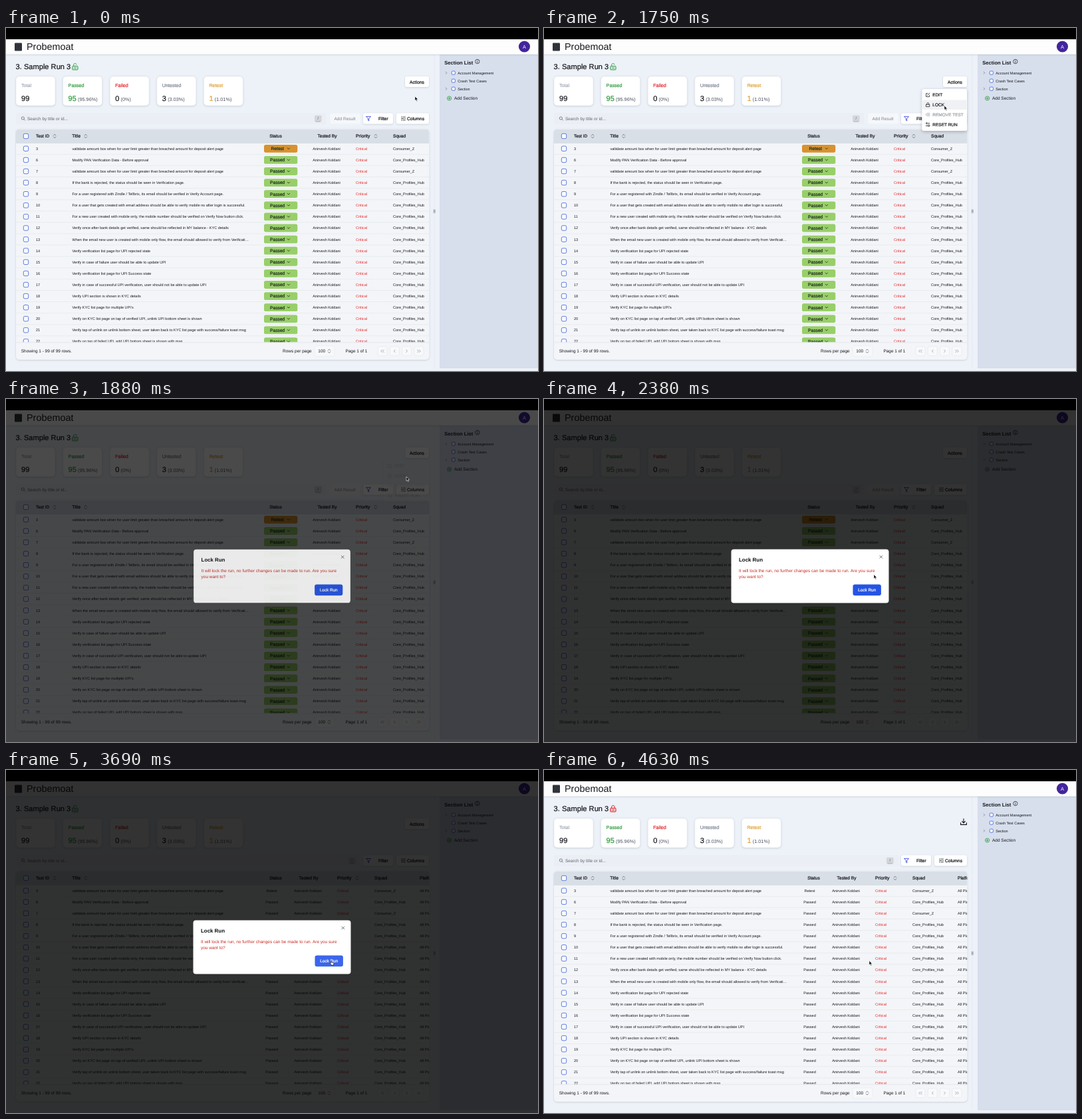
Recreate the animation shown at these times as an HTML page. Size 800 px wide and 517 px high, loop 5.06 s.

```html
<!DOCTYPE html>
<html lang="en">
<head>
<meta charset="utf-8">
<title>Lock a test run</title>
<style>
html, body { margin: 0; width: 100%; height: 100%; overflow: hidden; background: #edf1f8; }
svg { display: block; width: 800px; height: 517px; }
text { font-family: "Liberation Sans", Arial, sans-serif; text-rendering: geometricPrecision; white-space: pre; }
.line { fill: none; stroke-linecap: round; stroke-linejoin: round; }
</style>
</head>
<body>
<svg id="stage" viewBox="0 0 800 517"></svg>
<script>
const INK = '#16181d', GRAY = '#7d8696', RED = '#e5262b', GREEN = '#2f9a3c', BLUE = '#4468d8';
const TESTER = 'Anirvesh Koldani', SQUAD = 'Core_Profiles_Hub', SQUAD_ALT = 'Consumer_Z';
const TITLES = [
  'valitdate amount box when for user limit greater than breached amount for deposit alert page',
  'Modify PAN Verification Data - Before approval',
  'valitdate amount box when for user limit greater than breached amount for deposit alert page',
  'If the bank is rejected, the status should be seen in Verification page.',
  'For a user registered with Zindle / Tellbrix, its email should be verified in Verify Account page.',
  'For a user that gets created with email address should be able to verify mobile no after login is successful.',
  'For a new user created with mobile only, the mobile number should be verified on Verify Now button click.',
  'Verify once after bank details get verified, same should be reflected in MY balance - KYC details',
  'When the email new user is created with mobile only flow, the email should allowed to verify from Verificati…',
  'Verify verification list page for UPI rejected state',
  'Verify in case of failure user should be able to update UPI',
  'Verify verification list page for UPI Success state',
  'Verify in case of successful UPI verification, user should not be able to update UPI',
  'Verify UPI section is shown in KYC details',
  "Verify KYC list page for multiple UPI's",
  'Verify on KYC list page on tap of verified UPI, unlink UPI bottom sheet is shown',
  'Verify tap of unlink on unlink bottom sheet, user taken back to KYC list page with success/failure toast msg',
  'Verify on tap of failed UPI, add UPI bottom sheet is shown with msg'
];

// Text is placed by the middle of its capitals.
const text = (x, y, s, size = 5.55, fill = INK, o = {}) =>
  `<text x="${x}" y="${y + size * 0.358}" font-size="${size}" fill="${fill}"` +
  (o.mid ? ' text-anchor="middle"' : '') + (o.bold ? ' font-weight="700"' : '') +
  (o.semi ? ` stroke="${fill}" stroke-width=".22"` : '') + `>${s}</text>`;
const rect = (x, y, w, h, fill, r = 0, more = '') =>
  `<rect x="${x}" y="${y}" width="${w}" height="${h}" rx="${r}" fill="${fill}" ${more}/>`;
const line = (d, stroke = INK, w = 0.8) => `<path class="line" d="${d}" stroke="${stroke}" stroke-width="${w}"/>`;
const ring = (x, y, r, stroke, w = 0.8) =>
  `<circle cx="${x}" cy="${y}" r="${r}" fill="none" stroke="${stroke}" stroke-width="${w}"/>`;
const group = (id, inner, more = '') => `<g id="${id}" ${more}>${inner}</g>`;
const box = (x, y, s = 7.4) =>
  rect(x - s / 2, y - s / 2, s, s, '#f8faff', s / 4, `stroke="${BLUE}" stroke-width=".85"`);
const button = (x, y, w, h) => rect(x, y, w, h, '#fff', 3, 'filter="url(#soft)"');
const sorter = (x, y) => line(`M${x - 1.8} ${y - 1}l1.8 -1.8 1.8 1.8M${x - 1.8} ${y + 1}l1.8 1.8 1.8 -1.8`, '#4d5562', 0.7);
const chevron = (x, y, dir, stroke, s = 1.9) => line(`M${x - dir * s / 2} ${y - s}l${dir * s} ${s} ${-dir * s} ${s}`, stroke, 0.75);

function header() {
  return rect(0, 0, 800, 17, '#000') + rect(0, 17, 800, 22.5, '#fdfdfd', 0, 'filter="url(#soft)"') +
    rect(0, 0, 800, 17, '#000') + rect(13, 22.5, 11, 12, '#30343a', 1) +
    text(31, 28, 'Probemoat', 14.4) +
    '<circle cx="779.5" cy="28" r="8.6" fill="#43259b"/>' + text(779.5, 28.1, 'A', 7.4, '#fff', { mid: 1 });
}

function sidebar() {
  const items = ['Account Management', 'Crash Test Cases', 'Section'];
  let s = rect(652, 40, 148, 473, '#d7dfed') + line('M644 40V513', '#dfe4ee', 0.6) +
    rect(642.4, 273, 3.6, 6.4, '#cdd3dd', 1) +
    line('M643.6 274.5v3.4M645 274.5v3.4', '#6c7480', 0.5) +
    text(659.3, 52.4, 'Section List', 7.6, INK, { bold: 1 }) +
    ring(708.8, 50.5, 3.2, INK, 0.7) + line('M708.8 50.2v2M708.8 48.8v.1', INK, 0.7);
  items.forEach((name, i) => {
    const y = 67.6 + 12 * i;
    s += box(672.8, y, 5.2) + text(679.2, y, name);
    if (i !== 1) s += chevron(662, y, 1, '#6c7686', 1.6);
  });
  return s + ring(666.6, 106, 3.1, GREEN) + line('M665 106h3.2M666.6 104.4v3.2', GREEN) +
    text(674, 106, 'Add Section', 6.5);
}

function cards() {
  return [
    ['Total', '99', '', GRAY, INK], ['Passed', '95', '(95.96%)', GREEN, GREEN],
    ['Failed', '0', '(0%)', RED, INK], ['Untested', '3', '(3.03%)', GRAY, INK],
    ['Retest', '1', '(1.01%)', '#e0a035', '#e0a035']
  ].map(([label, n, pct, c1, c2], i) => {
    const x = 15 + 70.6 * i;
    return rect(x, 73, 59, 44, '#fff', 5, 'filter="url(#soft)" stroke="#dfe3ea" stroke-width=".5"') +
      text(x + 8, 86.2, label, 7.2, c1, { semi: i > 0 }) + text(x + 8, 106.3, n, 11.1, c2, { semi: 1 }) +
      text(x + (n.length > 1 ? 22.4 : 16.4), 107.3, pct, 7.3, '#4b5361');
  }).join('');
}

function toolbar() {
  return rect(15, 128, 518, 17, '#ebeef4', 3) + ring(25.4, 136, 2.1, '#59616e', 0.75) +
    line('M27 137.6l1.6 1.6', '#59616e', 0.75) +
    text(32, 136.5, 'Search by title or id...', 6.5, '#5b6370') +
    button(537, 128.5, 45, 16) + line('M541.8 133.4h6.6l-2.6 3.2v3.4l-1.4-.9v-2.5z', '#3c49d6', 0.85) +
    text(560, 136.7, 'Filter', 6.67, INK, { semi: 1 }) +
    button(587, 128.5, 49, 16) + line('M594.6 134.2h1M597 134.2h3.4M594.6 136.5h3.4M599.6 136.5h.8M594.6 138.8h1M597 138.8h3.4', INK, 0.8) +
    text(603, 136.7, 'Columns', 6.6, INK, { semi: 1 });
}

const slashKey = x => rect(x, 131.8, 10.6, 9.4, '#d3d6db', 1.5) + line(`M${x + 2} 141h6.6`, '#8a919c', 0.6) +
  text(x + 5.3, 136.3, '/', 5.6, '#4d5562', { mid: 1 });

function tableBase() {
  let s = rect(15, 152.5, 621.5, 347.5, '#f3f5f8', 5, 'filter="url(#soft)"') +
    '<g clip-path="url(#table)">' + rect(15, 152.5, 621.5, 21.5, '#d9dfe7') + '</g>' +
    box(30, 163) + text(45, 163, 'Test ID', 6.5, INK, { semi: 1 }) + sorter(73.2, 163) +
    text(99.3, 163, 'Title', 6.9, INK, { semi: 1 }) + sorter(119.8, 163) +
    text(405.5, 163, 'Status', 6.6, INK, { mid: 1, semi: 1 });
  s += '<g clip-path="url(#rows)">';
  TITLES.forEach((title, i) => {
    const y = rowY(i);
    s += line(`M15 ${y + 8.55}H636.5`, '#dde1e7', 0.5) + box(30, y) +
      text(45, y, i ? i + 5 : 3) + text(99.4, y, title);
  });
  return s + '</g>';
}

const rowY = i => 181.8 + 17.1 * i;

function columns(locked) {
  const dx = locked ? -28 : 0;
  let s = text(483 + dx, 163, 'Tested By', 6.6, INK, { mid: 1, semi: 1 }) +
    text(526 + dx, 163, 'Priority', 6.9, INK, { semi: 1 }) + sorter(556 + dx, 163) +
    text(582 + dx, 163, 'Squad', 6.6, INK, { semi: 1 });
  if (locked) s += text(622, 163, 'Platform', 6.6, INK, { semi: 1 });
  s += '<g clip-path="url(#rows)">';
  TITLES.forEach((_, i) => {
    const y = rowY(i), status = i ? 'Passed' : 'Retest';
    if (locked) s += text(399.5, y, status, 5.55, INK, { mid: 1 }) + text(622, y, 'All Platforms');
    else s += rect(388, y - 5.9, 50.3, 11.8, i ? '#98cf69' : '#d8922f', 2.6) +
      text(408.2, y, status, 6.67, '#1f2c1c', { mid: 1, semi: 1 }) +
      line(`M423.2 ${y - 0.9}l1.7 1.8 1.7 -1.8`, '#1f2c1c', 0.8);
    s += text(482 + dx, y, TESTER, 5.55, INK, { mid: 1 }) + text(526 + dx, y, 'Critical', 5.55, RED) +
      text(582 + dx, y, i === 0 || i === 2 ? SQUAD_ALT : SQUAD);
  });
  return s + '</g>';
}

function footer() {
  let s = line('M15 474H636.5', '#d9dde4', 0.6) + text(22.8, 487, 'Showing 1 - 99 of 99 rows.', 6.45) +
    text(416, 487, 'Rows per page', 6.5) + rect(464, 479, 30, 16, '#f7f8fa', 3, 'stroke="#e3e6eb" stroke-width=".5"') +
    text(469.3, 487, '100', 6.5) + sorter(486, 487) + text(510.5, 487, 'Page 1 of 1', 6.45);
  [566, 584.3, 602.6, 621].forEach((x, i) => {
    const dir = i < 2 ? -1 : 1, double = i % 3 === 0;
    s += rect(x - 7, 480, 14, 14, '#f8f9fb', 2.5, 'stroke="#e2e5ea" stroke-width=".6"');
    for (const d of double ? [-1.4, 1.4] : [0]) s += chevron(x + d, 487, dir, '#8d95a1');
  });
  return s;
}

function padlock(color, shackle) {
  return rect(99.7, 57.4, 8.4, 5.6, color, 1, 'fill-opacity=".25"') +
    rect(99.7, 57.4, 8.4, 5.6, 'none', 1, `stroke="${color}" stroke-width="1"`) + line(shackle, color, 1) +
    line('M103.9 59.6v1.4', color, 1);
}

function openParts() {
  return padlock('#3fa653', 'M101.6 57.2v-1.4a2.3 2.3 0 0 1 4.5 -.7') + button(600, 73, 36, 16) +
    text(618, 81.2, 'Actions', 6.67, INK, { mid: 1, semi: 1 });
}

function doneParts() {
  return padlock(RED, 'M101.6 57.2v-1.4a2.3 2.3 0 0 1 4.6 0v1.4') +
    line('M631 73.6v6M628.6 77.4l2.4 2.4 2.4 -2.4M626.6 79.6v2.8h8.8v-2.8', INK, 1.1);
}

function menu() {
  const names = ['EDIT', 'LOCK', 'REMOVE TEST', 'RESET RUN'];
  const icons = [
    'M577 98.6h-2.4v5h5v-2.4M576.6 101.6l3.4 -3.6',
    'M574.8 115.4h5v3.2h-5zM575.8 115.2v-1a1.5 1.5 0 0 1 3 0v1',
    'M576.4 128.6h3.6M576.4 130.5h3.6M576.4 132.4h3.6M575.6 129l-1.8 1.5 1.8 1.5',
    'M574.4 143.6h5.4M575.6 142.4l-1.2 1.2 1.2 1.2M575 146.4v1.8M577.4 146h2.4v2.2h-2.4z'
  ];
  let s = rect(568.5, 92, 67.5, 63, '#fff', 3, 'filter="url(#drop)"');
  names.forEach((name, i) => {
    const y = 100.9 + 14.85 * i, c = i === 2 ? '#989da6' : INK;
    if (i === 1) s += rect(569.2, y - 7.2, 66, 14.4, '#f0f1f4', 1.5, 'id="hover"');
    s += line(icons[i], c, 0.75) + text(584.3, y, name, 6.5, c, { semi: 1 });
  });
  return s;
}

function dialog() {
  return rect(281.5, 226.6, 237, 81, '#fff', 4) + text(293, 242.2, 'Lock Run', 7.9, '#0c0d10', { bold: 1 }) +
    line('M504.8 236l4 4M508.8 236l-4 4', '#4a4d54', 0.75) +
    text(293, 258.4, 'It will lock the run, no further changes can be made to run. Are you sure', 6.47, '#c92a22') +
    text(293, 267.8, 'you want to?', 6.47, '#c92a22') +
    rect(464.5, 279.5, 42.4, 16.8, '#2554e4', 3, 'id="confirm"') +
    text(485.7, 288, 'Lock Run', 6.4, '#fff', { mid: 1, semi: 1 });
}

const arrow = '<path d="M0 0V6.4L1.5 5.1 2.5 7.4 3.6 6.9 2.6 4.7H4.5Z" fill="#000" stroke="#fff" stroke-width=".6" stroke-linejoin="round"/>';
const hand = '<path d="M-.5 .2q.6 -.7 1.1 0v2.3l2.7 .6q.8 .3 .6 1.2l-.5 2.3h-3l-2 -2.6q-.2 -.8 .6 -.7l.5 .4z" fill="#fff" stroke="#000" stroke-width=".55" stroke-linejoin="round"/>';

const stage = document.getElementById('stage');
stage.innerHTML = `<defs>
  <filter id="soft" x="-20%" y="-20%" width="140%" height="150%"><feDropShadow dx="0" dy=".7" stdDeviation="1" flood-color="#5a6478" flood-opacity=".28"/></filter>
  <filter id="drop" x="-20%" y="-20%" width="140%" height="150%"><feDropShadow dx="0" dy="1.5" stdDeviation="2.2" flood-color="#2b3342" flood-opacity=".3"/></filter>
  <clipPath id="table"><rect x="15" y="152.5" width="621.5" height="347.5" rx="5"/></clipPath>
  <clipPath id="rows"><rect x="15" y="174" width="621.5" height="299.5"/></clipPath>
</defs>` +
  rect(0, 0, 800, 517, '#edf1f8') + sidebar() + header() +
  text(14.6, 58, '3. Sample Run 3', 11.1, INK, { semi: 1 }) + cards() + toolbar() + tableBase() +
  group('open', columns(false) + slashKey(464) + rect(481, 127, 55, 19, '#edf1f8') +
    rect(487, 128.5, 46, 16, '#f5f7fa', 3) + text(493.5, 136.7, 'Add Result', 6.55, '#7c828c')) +
  group('locked', columns(true) + slashKey(515), 'clip-path="url(#view)"') +
  '<clipPath id="view"><rect x="15" y="120" width="621.5" height="380"/></clipPath>' +
  footer() + group('before', openParts()) + group('after', doneParts()) +
  group('menu', menu()) + rect(0, 0, 800, 517, '#000', 0, 'id="shade"') + group('dialog', dialog()) +
  group('cursor', group('arrow', arrow) + group('hand', hand));

const el = {};
stage.querySelectorAll('g[id], rect[id]').forEach(e => { el[e.id] = e; });
const show = (name, on) => el[name].setAttribute('opacity', +on);

const LOOP = 5060, TICK = 62.5;
const CUE = { menu: 9, hover: 12, dialog: 28.5, columns: 57, close: 61 };
const PATH = [
  [0, 615, 103], [6, 618, 83], [9, 618, 83], [15, 595, 125], [17, 596, 124], [21, 602, 117],
  [32, 602, 117], [38, 496, 264.5], [40, 496, 266], [46, 489, 287.5], [81, 489, 287.5]
];
const clamp = v => Math.max(0, Math.min(1, v));
const easeOut = v => 1 - (1 - clamp(v)) ** 2.4;

function pointer(n) {
  const i = Math.max(1, PATH.findIndex(p => p[0] >= n));
  const [a, ax, ay] = PATH[i - 1], [b, bx, by] = PATH[i];
  const u = clamp((n - a) / (b - a)), k = u * u * (3 - 2 * u);
  return [ax + (bx - ax) * k, ay + (by - ay) * k];
}

function draw(ms) {
  const n = Math.floor((ms % LOOP + 2.5) / TICK);
  const locked = n >= CUE.columns, closed = n >= CUE.close;
  const modal = closed ? 0 : easeOut((n - CUE.dialog) / 2.5);
  const [x, y] = pointer(n);
  const onConfirm = n >= 43 && n < CUE.close + 1, onActions = n >= 4 && n < CUE.menu;

  show('open', !locked);
  show('locked', locked);
  show('before', !closed);
  show('after', closed);
  show('menu', n < CUE.dialog ? easeOut((n - CUE.menu + 1) / 2) : clamp((31 - n) / 2) ** 3);
  show('hover', n >= CUE.hover);
  show('shade', 0.8 * modal);
  show('dialog', modal);
  const k = 0.95 + 0.05 * modal;
  el.dialog.setAttribute('transform', `translate(400 267) scale(${k}) translate(-400 -267)`);
  el.confirm.setAttribute('fill', onConfirm ? '#3b65ec' : '#2554e4');
  el.cursor.setAttribute('transform', `translate(${x} ${y})`);
  show('hand', onConfirm || onActions);
  show('arrow', !(onConfirm || onActions));
}

const start = performance.now();
function loop() {
  draw(performance.now() - start);
  requestAnimationFrame(loop);
}
draw(0);
requestAnimationFrame(loop);
</script>
</body>
</html>
```
